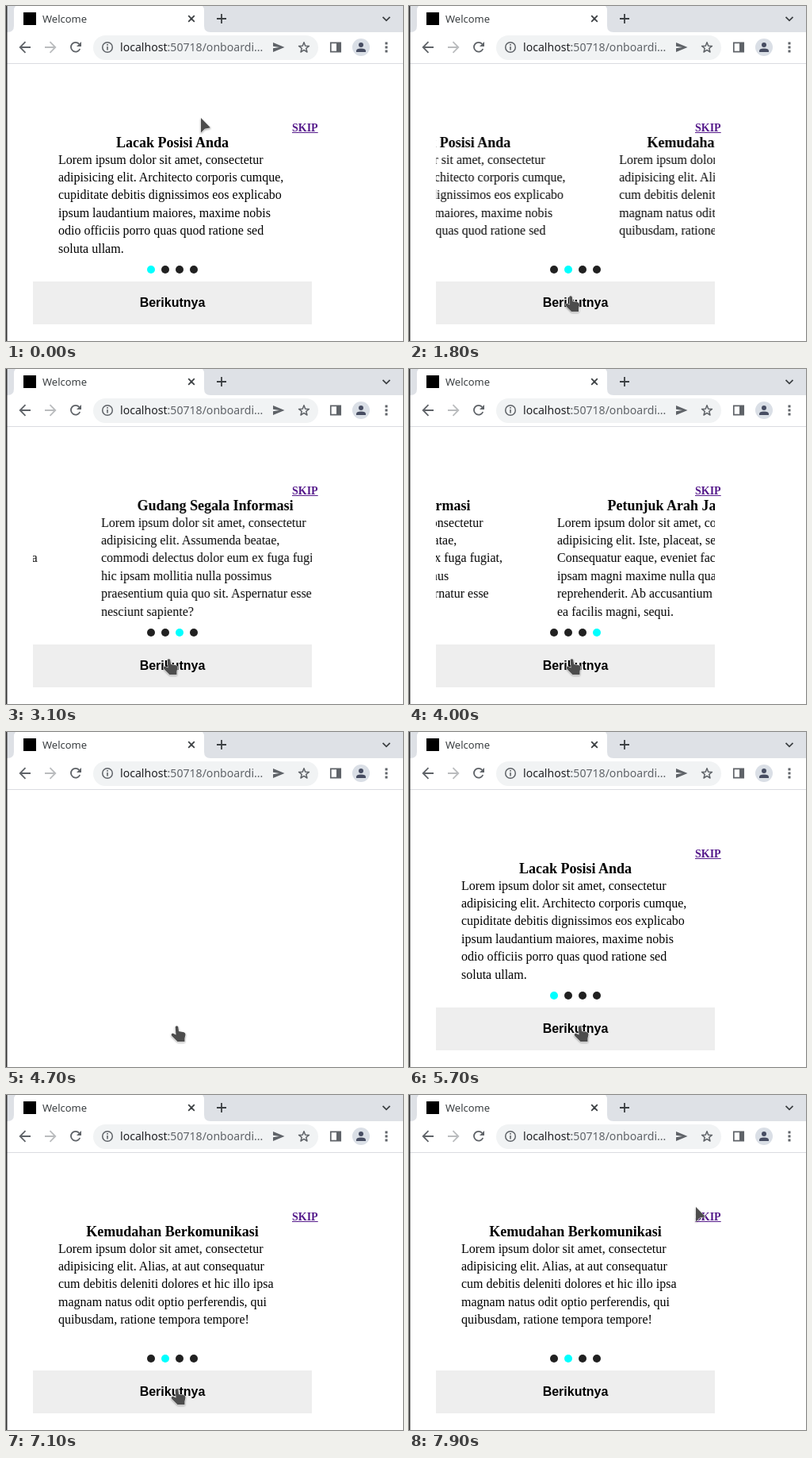
An HTML page that plays this animation: 501x422 px, repeating every 8000 ms.

```html
<!DOCTYPE html>
<html lang="id">
<head>
<meta charset="utf-8">
<title>Welcome</title>
<style>
  html, body { margin: 0; width: 100%; height: 100%; overflow: hidden; background: #fff; }
  #stage { position: absolute; left: 0; top: 0; width: 501px; height: 422px; overflow: hidden; }
  #stage > *, #page > *, .slide { position: absolute; }
  svg { left: 0; top: 0; overflow: visible; }
  .ui { font-family: "Noto Sans", "Open Sans", sans-serif; white-space: pre; line-height: 20px; }
  #tab { left: 46px; top: 6px; font-size: 13px; color: #3c4043; }
  #url { left: 144px; top: 42px; font-size: 14.1px; color: #5f6368; }
  #url b { font-weight: 400; color: #202124; }
  #page { left: 0; top: 0; font-family: "Liberation Serif", "Times New Roman", serif; color: #000; }
  #skip { left: 361px; top: 146px; font-size: 14px; line-height: 16px; font-weight: 700;
    color: #551a8b; text-decoration: underline; }
  #view { left: 34px; top: 160px; width: 352px; height: 164px; overflow: hidden; }
  #track { position: absolute; left: 0; top: 0; will-change: transform; }
  .slide { top: 2px; width: 352px; }
  .slide h3 { margin: 0; font-size: 18px; line-height: 20px; text-align: center; }
  .slide p { margin: .6px 0 0 32px; font-size: 16px; line-height: 22.4px; white-space: pre; }
  .dot { top: 327px; width: 10px; height: 10px; border-radius: 50%; }
  #next { left: 34px; top: 347px; width: 352px; height: 54px; background: #eee; text-align: center;
    font: 700 16px/54px "Liberation Sans", Arial, sans-serif; }
  .cursor { fill: #4d4d4d; stroke: #fff; stroke-width: 1; paint-order: stroke;
    filter: drop-shadow(0 1px 1px rgba(0,0,0,.35)); }
</style>
</head>
<body>
<div id="stage">
  <svg width="501" height="422" fill="none" stroke="#5f6368" stroke-width="1.8">
    <g stroke="none">
      <path fill="#dee1e6" d="M0 0H501V33H0z"/>
      <path fill="#fff" d="M2 33Q10 33 10 25V6Q10 -2 18 -2H242Q250 -2 250 6V25Q250 33 258 33z"/>
      <path fill="#dadce0" d="M0 72H501V73H0z"/>
      <rect x="110" y="37" width="284" height="31" rx="15.5" fill="#f1f3f4"/>
      <path fill="#333" d="M0 0H1.5V422H0z"/>
      <rect id="icon" x="22" y="8" width="16" height="16" fill="#000"/>
    </g>
    <path id="spin" stroke="#1a73e8" stroke-width="2" d="M30 9A7 7 0 1 1 23 16"/>
    <path stroke="#3c4043" d="M230.2 12.2l7.6 7.6m0-7.6l-7.6 7.6M266 16h12m-6-6v12M475.5 13.8l4.5 4.5 4.5-4.5"/>
    <path d="M31 52H18m6.5-6.8L17.7 52l6.8 6.8"/>
    <path stroke="#babcbe" d="M49 52H62m-6.5-6.8L62.3 52l-6.8 6.8"/>
    <path d="M93.3 54A5.9 5.9 0 1 1 92.3 47.8"/>
    <path fill="#5f6368" stroke="none" d="M95 45v6h-6zM337 46l14.5 6-14.5 6v-4.7l8-1.3-8-1.3z"/>
    <circle cx="128" cy="52" r="6.3" stroke-width="1.5"/>
    <path stroke-width="1.6" d="M128 51v4.5M128 48v1.7"/>
    <path id="star" stroke-width="1.5" stroke-linejoin="round"/>
    <path stroke-width="1.7" d="M409.8 46.3H422.2V57.7H409.8z"/>
    <path fill="#5f6368" stroke="none" d="M417 46h6v12h-6z"/>
    <g stroke="none">
      <circle cx="448" cy="52" r="11" fill="#dadfe6"/>
      <path fill="#474d62" d="M442 58v-1.5Q442 53.5 448 53.5T454 56.5V58z"/>
      <circle cx="448" cy="49" r="3" fill="#474d62"/>
      <path fill="#5f6368" d="M478.5 45.5h3v3h-3zM478.5 50.5h3v3h-3zM478.5 55.5h3v3h-3z"/>
    </g>
  </svg>
  <div id="tab" class="ui">Welcome</div>
  <div id="url" class="ui"><b>localhost</b>:50718/onboardi...</div>
  <div id="page">
    <div id="skip">SKIP</div>
    <div id="view"><div id="track"></div></div>
    <div id="next">Berikutnya</div>
  </div>
  <svg width="501" height="422">
    <path id="arrow" class="cursor" d="M0 0V18.5L4.8 13.7 12 12.3z"/>
    <path id="hand" class="cursor" d="M-1.8 1.5Q0 -1 1.8 1.5L2.5 7 9 8.3Q11.3 9 11 11.5L10 15.5V20H1L-6.5 12.5Q-7.5 10 -5 9.5L-1 11.5z"/>
  </svg>
</div>
<script>
const $ = id => document.getElementById(id);
const LOOP = 8000, FRAME = 100, WIDTH = 352, SLIDE_MS = 300;
const CLEAR = 4700, LOAD = 5500, SHOW = 5600, READY = 5700;
const starts = [1721.5, 2935.5, 3885.3, 6736];

const slides = [
  ["Lacak Posisi Anda", `adipisicing elit. Architecto corporis cumque,
cupiditate debitis dignissimos eos explicabo
ipsum laudantium maiores, maxime nobis
odio officiis porro quas quod ratione sed
soluta ullam.`],
  ["Kemudahan Berkomunikasi", `adipisicing elit. Alias, at aut consequatur
cum debitis deleniti dolores et hic illo ipsa
magnam natus odit optio perferendis, qui
quibusdam, ratione tempora tempore!`],
  ["Gudang Segala Informasi", `adipisicing elit. Assumenda beatae,
commodi delectus dolor eum ex fuga fugiat,
hic ipsam mollitia nulla possimus
praesentium quia quo sit. Aspernatur esse
nesciunt sapiente?`],
  ["Petunjuk Arah Jalan", `adipisicing elit. Iste, placeat, sed.
Consequatur eaque, eveniet facere id
ipsam magni maxime nulla quaerat quod
reprehenderit. Ab accusantium dolorem
ea facilis magni, sequi.`]
];

// Pointer moves: start, end, target x, target y
const home = [246, 141];
const moves = [
  [600, 1100, 204, 365],
  [2700, 2800, 205.5, 365],
  [4400, 4600, 215.5, 370],
  [7100, 7600, 356, 142],
  [7800, 7900, 362, 141]
];

$("track").innerHTML = slides.map(([title, text], i) =>
  `<div class="slide" style="left:${i * WIDTH}px"><h3>${title}</h3>` +
  `<p>Lorem ipsum dolor sit amet, consectetur\n${text}</p></div>`).join("");

const dots = slides.map((_, i) => {
  const dot = document.createElement("div");
  dot.className = "dot";
  dot.style.left = 178 + i * 18 + "px";
  return $("page").appendChild(dot);
});

$("star").setAttribute("d", "M" + Array.from({length: 10}, (_, i) => {
  const r = i % 2 ? 2.9 : 6.8, a = i * Math.PI / 5;
  return [376 + r * Math.sin(a), 52.5 - r * Math.cos(a)];
}).join("L") + "z");

const clamp = x => Math.min(1, Math.max(0, x));
const smooth = x => x * x * (3 - 2 * x);

// CSS "ease" curve
function ease(x) {
  if (x <= 0 || x >= 1) return clamp(x);
  let lo = 0, hi = 1, u;
  for (let i = 0; i < 24; i++) {
    u = (lo + hi) / 2;
    if (.75 * u * (1 - u) + u ** 3 < x) lo = u; else hi = u;
  }
  return .3 * u * (1 - u) ** 2 + 3 * u * u * (1 - u) + u ** 3;
}

function pointer(t) {
  let [x, y] = home;
  for (const [from, to, tx, ty] of moves) {
    const k = smooth(clamp((t - from) / (to - from)));
    x += (tx - x) * k;
    y += (ty - y) * k;
  }
  return [x, y];
}

const show = (id, on) => $(id).style.display = on ? "" : "none";

function draw(t) {
  const run = starts.filter(s => s <= t && (t < CLEAR || s > CLEAR));
  const pos = run.reduce((sum, s) => sum + ease((t - s) / SLIDE_MS), 0);
  $("track").style.transform = `translateX(${-pos * WIDTH}px)`;
  dots.forEach((dot, i) => dot.style.background = i === run.length ? "#0ff" : "#212121");

  const loading = t >= LOAD && t < READY;
  show("page", t < CLEAR || t >= SHOW);
  show("icon", !loading);
  show("spin", loading);

  const [x, y] = pointer(t), over = y >= 347;
  show("hand", over);
  show("arrow", !over);
  $(over ? "hand" : "arrow").setAttribute("transform", `translate(${x} ${y})`);
}

// The picture advances ten times per second
const begin = performance.now();
function tick(now) {
  const t = Math.max(0, now - begin) % LOOP;
  draw(Math.floor(t / FRAME) * FRAME);
  requestAnimationFrame(tick);
}
draw(0);
requestAnimationFrame(tick);
</script>
</body>
</html>
```
